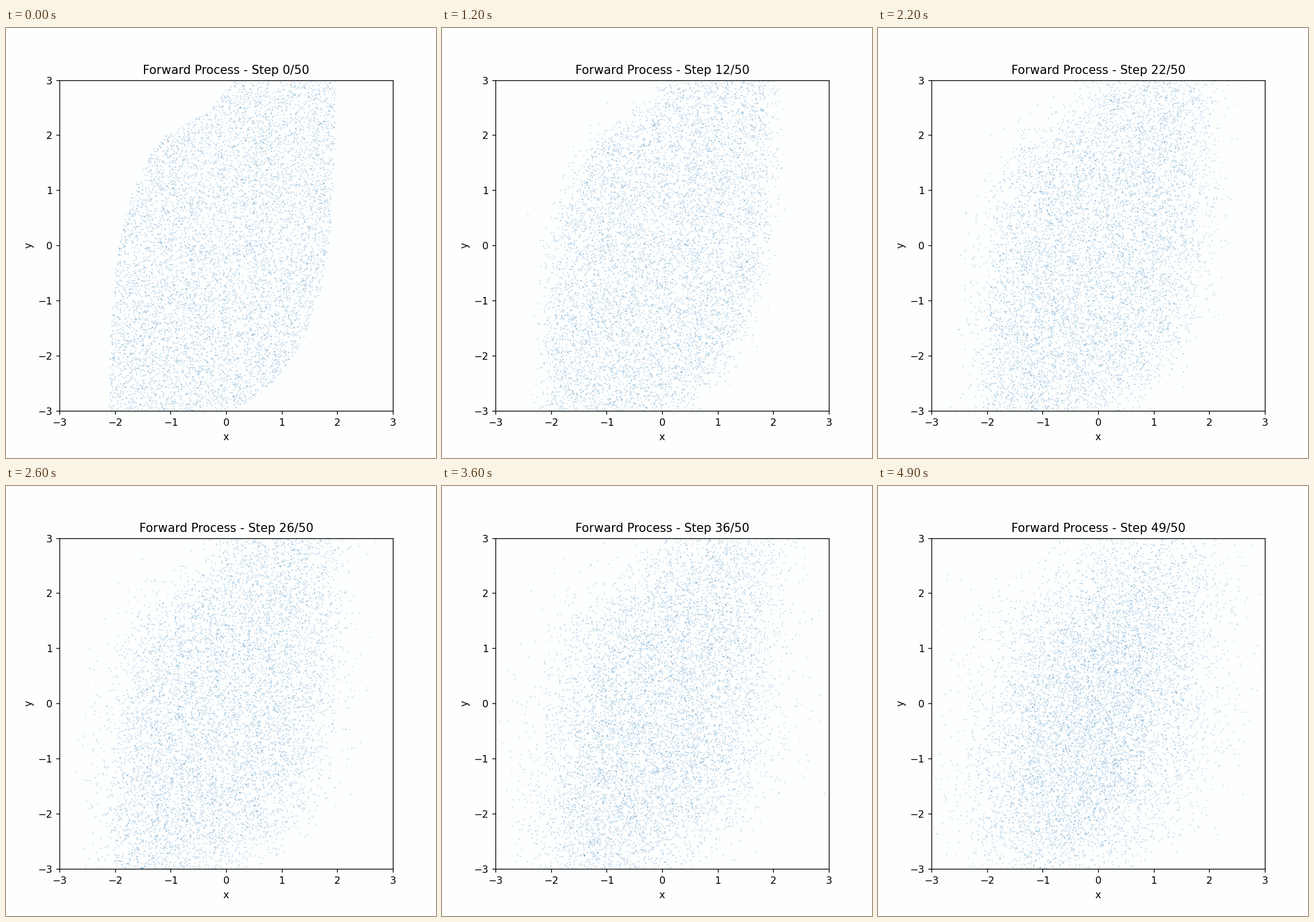
A matplotlib script for the animation above (5000 ms loop, 748x748 px).

```python
import matplotlib.pyplot as plt
import numpy as np
from matplotlib.animation import FuncAnimation

STEPS = 50
SAMPLES = 9000
SIZE = 748
BACKGROUND = "#fdfefe"

plt.rcParams["font.family"] = "DejaVu Sans"
rng = np.random.default_rng(7)


def left_edge(y):
    bump = 0.35 * np.exp(-((y - 2.5) / 0.35) ** 2)
    return -2.14 + 0.205 * np.exp(0.8 * y) + bump


def right_edge(y):
    return 1.98 - 0.145 * np.exp(-0.84 * y)


def sample_region(count):
    """Fill the area between the two edges evenly."""
    x, y = rng.uniform([[-2.2], [-4]], [[2], [4]], (2, 4 * count))
    inside = (left_edge(y) < x) & (x < right_edge(y))
    return np.column_stack([x, y])[inside][:count]


def diffuse(points):
    """Return every state of the noising chain with linearly growing variance."""
    states = [points]
    for beta in np.linspace(1e-4, 0.02, STEPS):
        noise = rng.standard_normal(points.shape)
        points = np.sqrt(1 - beta) * points + np.sqrt(beta) * noise
        states.append(points)
    return states


states = diffuse(sample_region(SAMPLES))

fig, ax = plt.subplots(figsize=(6, 6), dpi=SIZE / 6, facecolor=BACKGROUND)
fig.subplots_adjust(left=93.2 / SIZE, right=673 / SIZE,
                    bottom=82.2 / SIZE, top=657.4 / SIZE)
ax.set_facecolor(BACKGROUND)
ax.set(xlim=(-3, 3), ylim=(-3, 3), xlabel="x", ylabel="y")
dots = ax.scatter(*states[0].T, s=1.6, alpha=0.28, color="tab:blue", linewidths=0)
title = ax.set_title("")


def update(step):
    dots.set_offsets(states[step])
    title.set_text(f"Forward Process - Step {step}/{STEPS}")
    return dots, title


anim = FuncAnimation(fig, update, frames=STEPS, interval=100,
                     repeat=True, repeat_delay=0)
plt.show()
```
